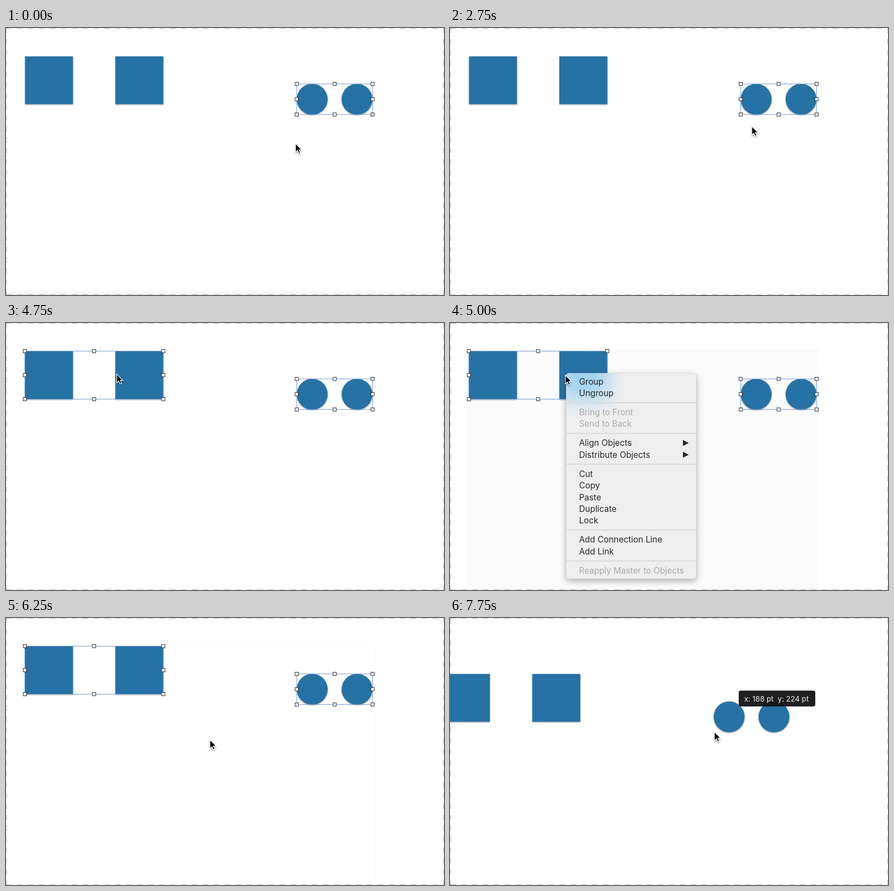
Write an HTML page that moves like this. It is 801 by 489 pixels and loops after 8 s.

```html
<!DOCTYPE html>
<html lang="en">
<head>
<meta charset="utf-8">
<title>Grouping shapes</title>
<style>
  html, body { margin: 0; width: 100%; height: 100%; overflow: hidden; background: #fff; }
  svg { display: block; }
  text { font-family: Inter, "Open Sans", sans-serif; white-space: pre; }
  #menu text { font-size: 15.4px; fill: #262626; }
  #menu text.off { fill: #a9a9a9; }
  #tip text { font-size: 13.5px; fill: #f2f2f2; }
  .frame { fill: none; stroke: #7399dc; }
  .handle { fill: #fff; stroke: #2a2a2a; }
</style>
</head>
<body>
<svg width="801" height="489" viewBox="0 0 801 489">
  <defs>
    <filter id="soft" x="-20%" y="-20%" width="140%" height="150%">
      <feDropShadow dx="0" dy="1.2" stdDeviation="1" flood-opacity=".4"/>
    </filter>
    <filter id="lift" x="-50%" y="-50%" width="200%" height="200%">
      <feDropShadow dx="0" dy="1.8" stdDeviation="1.5" flood-opacity=".45"/>
    </filter>
    <filter id="deep" x="-20%" y="-20%" width="140%" height="140%">
      <feDropShadow dx="0" dy="4" stdDeviation="6" flood-opacity=".3"/>
    </filter>
    <filter id="blur" x="-80%" y="-80%" width="260%" height="260%">
      <feGaussianBlur stdDeviation="18"/>
    </filter>
    <clipPath id="menuClip"><rect x="212.5" y="92" width="238" height="376.5" rx="5"/></clipPath>
    <linearGradient id="fade" x2="0" y2="1">
      <stop offset="0" stop-color="#fff"/>
      <stop offset="1" stop-color="#ececec"/>
    </linearGradient>
  </defs>

  <rect id="base" y="481" width="801" height="8" fill="url(#fade)"/>
  <rect id="tint" x="30" y="48" width="646" height="441" fill="#fbfbfb"/>
  <path id="trace" d="M290 48.5H674.5V489" fill="none" stroke="#f6f6f6"/>
  <path d="M0 .5H801M0 488.5H801M.5 0V489M800.5 0V489" stroke="#b0b0b0" stroke-dasharray="10 10" fill="none"/>

  <g id="shapes" fill="#2872a5" filter="url(#soft)">
    <rect x="34.8" y="52" width="87.7" height="87.5"/>
    <rect x="200" y="52" width="87.8" height="87.5"/>
    <circle cx="560" cy="130.5" r="28.3"/>
    <circle cx="642" cy="130.5" r="28.3"/>
  </g>
  <g id="pickSquares"></g>
  <g id="pickCircles"></g>

  <g id="menu">
    <rect x="212.5" y="92" width="238" height="376.5" rx="5" fill="#efeeef" stroke="#c4c4c4" stroke-width=".6" filter="url(#deep)"/>
    <g clip-path="url(#menuClip)">
      <rect x="200" y="52" width="88" height="88" fill="#9fd3f2" filter="url(#blur)"/>
    </g>
  </g>

  <g id="tip">
    <rect x="528" y="133" width="140" height="29" rx="4" fill="#111" fill-opacity=".94"/>
    <text x="538" y="153"></text>
  </g>

  <path id="cursor" d="M.5.5V16.5L4.2 13.1 6.6 18.8 9.3 17.6 6.9 12.1H11.8Z" fill="#000" stroke="#fff" stroke-width="1.1" filter="url(#lift)"/>
</svg>

<script>
const LOOP = 8000, STEP = 250;
const $ = id => document.getElementById(id);

function add(parent, tag, attrs, label = '') {
  const el = document.createElementNS('http://www.w3.org/2000/svg', tag);
  for (const key in attrs) el.setAttribute(key, attrs[key]);
  el.textContent = label;
  parent.append(el);
}

function selection(parent, x, y, w, h) {
  add(parent, 'rect', { class: 'frame', x, y, width: w, height: h });
  for (let i = 0; i < 3; i++)
    for (let j = 0; j < 3; j++)
      if (i !== 1 || j !== 1)
        add(parent, 'rect', {
          class: 'handle', width: 6, height: 6,
          x: x + w * i / 2 - 3, y: y + h * j / 2 - 3
        });
}
selection($('pickSquares'), 34.5, 51.5, 253.2, 88);
selection($('pickCircles'), 531.7, 102.4, 138.7, 56);

// "~" marks a disabled entry, ">" a submenu
const sections = [
  ['Group', 'Ungroup'],
  ['~Bring to Front', '~Send to Back'],
  ['>Align Objects', '>Distribute Objects'],
  ['Cut', 'Copy', 'Paste', 'Duplicate', 'Lock'],
  ['Add Connection Line', 'Add Link'],
  ['~Reapply Master to Objects']
];
let y = 107;
sections.forEach((items, n) => {
  if (n) {
    add($('menu'), 'path', { d: `M213 ${y - 17.5}H450`, stroke: '#d9d9da', 'stroke-width': 2 });
  }
  for (const item of items) {
    add($('menu'), 'text', { x: 236, y: y + 5.5, class: item[0] === '~' ? 'off' : '' }, item.replace(/^[~>]/, ''));
    if (item[0] === '>') add($('menu'), 'path', { d: `M426 ${y - 5.5}l10.5 5.5-10.5 5.5z`, fill: '#262626' });
    y += 21.4;
  }
  y += 13.6;
});

// time, x, y of the pointer
const path = [
  [0, 529, 211], [2250, 529, 211], [2750, 551.5, 179.5], [3000, 530, 165],
  [3750, 250, 100], [4250, 215, 95], [4750, 202, 93], [5000, 210.5, 95],
  [5500, 235, 106], [5750, 250, 120], [6250, 372.5, 222.5], [6500, 460, 190],
  [6750, 532.5, 157.5], [7000, 532.5, 157.5], [7750, 483, 208]
];

function pointer(t) {
  const next = path.findIndex(p => p[0] > t);
  if (next < 0) return path[path.length - 1].slice(1);
  const a = path[next - 1], b = path[next];
  const k = (t - a[0]) / (b[0] - a[0]);
  return [a[1] + (b[1] - a[1]) * k, a[2] + (b[2] - a[2]) * k];
}

const show = (id, on) => $(id).style.display = on ? '' : 'none';
const move = (id, x, y) => $(id).setAttribute('transform', `translate(${x} ${y})`);

function draw(now) {
  const t = Math.floor(now % LOOP / STEP) * STEP;
  const menu = t >= 5000 && t < 5750;
  const drag = t >= 7250;
  const k = Math.max(0, (t - 7000) / 750);
  const dx = -49.5 * k, dy = 50.5 * k;

  show('base', t < 500);
  show('tint', menu);
  show('trace', t >= 5750 && t < 6750);
  show('menu', menu);
  show('pickSquares', t >= 3750 && !drag);
  show('pickCircles', !drag);
  show('tip', drag);

  move('shapes', dx, dy);
  move('tip', dx + 49.5, dy - 50.5);
  $('tip').lastElementChild.textContent =
    `x: ${Math.round(188 + 49.5 * (1 - k))} pt  y: ${Math.round(224 - 50.5 * (1 - k))} pt`;
  move('cursor', ...pointer(t));
  requestAnimationFrame(draw);
}
draw(0);
</script>
</body>
</html>
```
